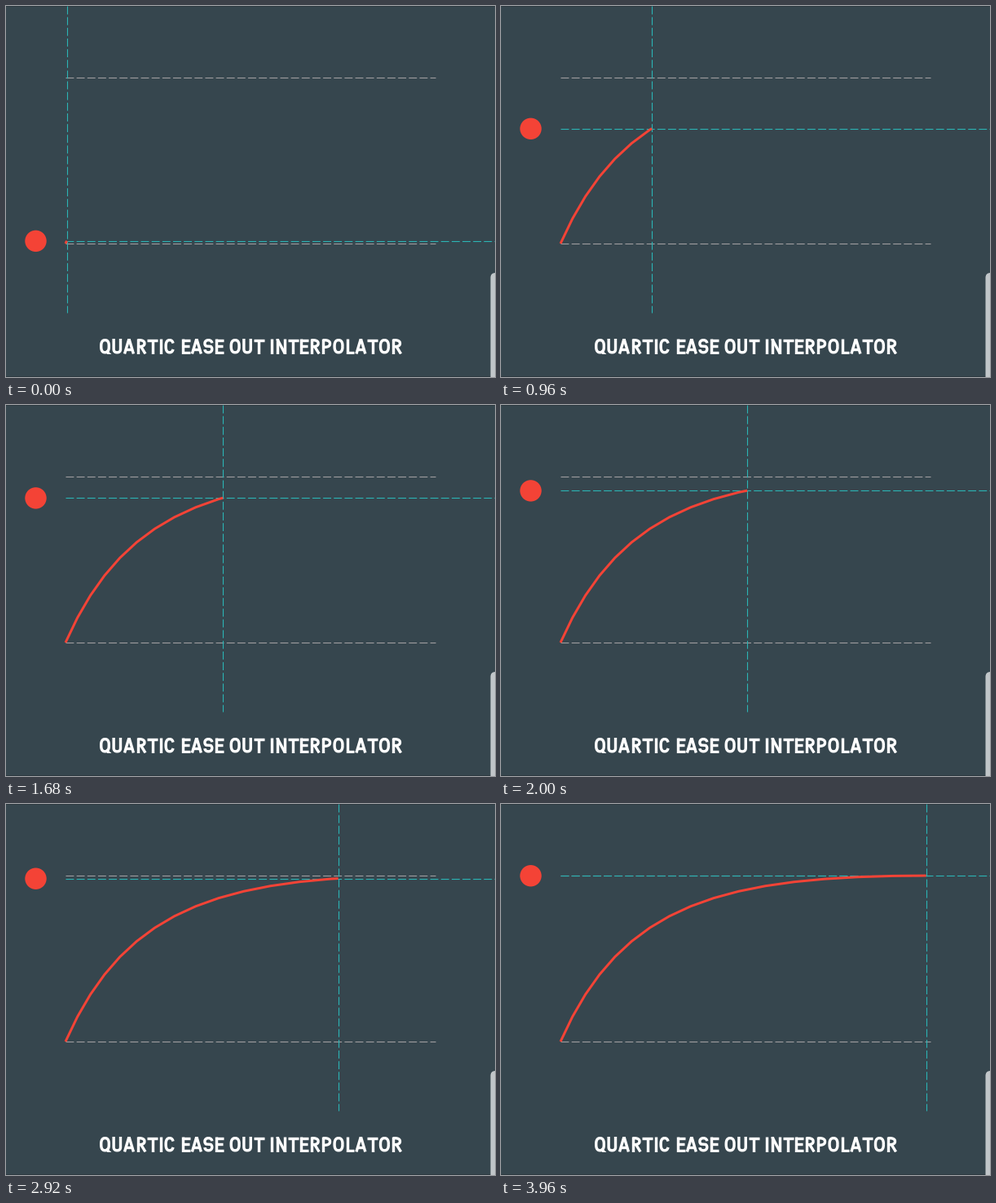
Recreate the animation shown at these times as a matplotlib script. Size 600x456 px, loop 4000 ms.

```python
import numpy as np
import matplotlib.pyplot as plt
from matplotlib.animation import FuncAnimation
from matplotlib.collections import LineCollection
from matplotlib.patches import Circle, FancyBboxPatch, Rectangle

DPI = 64
W, H = 600, 456
PX = 72 / DPI
STEP = 40
FRAMES = 100

BG, RED, CYAN, GRAY = "#36464e", "#f44336", "#2bb5b5", "#a09ea0"
LEFT, RIGHT, TOP, BOTTOM = 73, 527, 88, 292

plt.rcParams["toolbar"] = "None"
fig = plt.figure(figsize=(W / DPI, H / DPI), dpi=DPI, facecolor=BG)
ax = fig.add_axes([0, 0, 1, 1])
ax.set_xlim(0, W)
ax.set_ylim(H, 0)
ax.axis("off")


def dashed(xs, ys, color, z):
    width = 1.1
    dash = (0, (9.9 / width, 3.25 / width))
    line, = ax.plot(xs, ys, color=color, lw=width * PX, ls=dash,
                    dash_capstyle="butt", zorder=z)
    return line


# Condensed capitals built from strokes; y runs up from the baseline.
EM, CAP, PEN = 26, 18.5, 3.4
ADVANCE = dict(Q=.578, U=.553, A=.582, R=.549, T=.532, I=.261, C=.562,
               E=.482, S=.532, O=.587, N=.609, P=.555, L=.468)
SPACE = .22


def arc(x0, x1, y0, y1, start, end, power=2.5):
    a = np.radians(np.linspace(start, end, 40))
    c, s = np.cos(a), np.sin(a)
    x = (x0 + x1) / 2 + (x1 - x0) / 2 * np.sign(c) * abs(c) ** (2 / power)
    y = (y0 + y1) / 2 + (y1 - y0) / 2 * np.sign(s) * abs(s) ** (2 / power)
    return list(zip(x, y))


def strokes(ch, adv):
    h = PEN / 2
    lo, hi, mid = h, CAP - h, CAP / 2
    l, r = 1.4 + h, adv - 1.2 - h
    cx = adv / 2
    stem = [(l, 0), (l, CAP)]
    if ch in "OQC":
        l, r = 1 + h, adv - 1 - h
        if ch == "C":
            return [arc(l, r, lo, hi, 24, 336)]
        ring = [arc(l, r, lo, hi, 0, 360)]
        return ring + ([[(cx + 1, 3.6), (adv - .9, -1.6)]] if ch == "Q" else [])
    if ch == "U":
        return [[(l, CAP)] + arc(l, r, lo, lo + 9, 180, 360) + [(r, CAP)]]
    if ch == "S":
        l, r = .8 + h, adv - .8 - h
        return [arc(l, r, mid - .6, hi, 5, 232, 2.2)
                + arc(l, r, lo, mid + .6, 52, -175, 2.2)]
    if ch == "A":
        foot = h + .4
        return [[(foot, 0), (cx, CAP), (adv - foot, 0)],
                [(cx - 4, 5.4), (cx + 4, 5.4)]]
    if ch == "N":
        return [stem, [(r, 0), (r, CAP)], [(l, CAP), (r, 0)]]
    if ch == "T":
        return [[(.4, hi), (adv - .4, hi)], [(cx, 0), (cx, hi)]]
    if ch == "I":
        return [[(cx, 0), (cx, CAP)]]
    if ch == "L":
        return [stem, [(l, lo), (adv - .4, lo)]]
    if ch == "E":
        return [stem, [(l, lo), (adv - .6, lo)], [(l, hi), (adv - .6, hi)],
                [(l, mid + .2), (adv - 1.5, mid + .2)]]
    waist = 8.2 if ch == "P" else 8.8
    bowl = [(l, hi)] + arc(2 * l - r + 2, r, waist, hi, 90, -90) + [(l, waist)]
    leg = [[(cx, waist), (adv - h - .1, 0)]] if ch == "R" else []
    return [stem, bowl] + leg


def title(text, x, base):
    lines = []
    for ch in text:
        if ch == " ":
            x += SPACE * EM
            continue
        adv = ADVANCE[ch] * EM
        lines += [[(x + px, base - py) for px, py in s] for s in strokes(ch, adv)]
        x += adv
    art = LineCollection(lines, colors="white", linewidths=PEN * PX,
                         capstyle="butt", joinstyle="miter")
    ax.add_collection(art, autolim=False)
    art.set_clip_path(Rectangle((0, base - CAP), W, CAP, transform=ax.transData))


# Ease-out-quart Bezier drawn as sixteen chords.
s = np.linspace(0, 1, 17)


def bezier(p1, p2):
    return 3 * s * (1 - s) ** 2 * p1 + 3 * s ** 2 * (1 - s) * p2 + s ** 3


curve_x = LEFT + (RIGHT - LEFT) * bezier(.165, .44)
curve_y = BOTTOM + (TOP - BOTTOM) * bezier(.84, 1)

# The sweep is nearly linear, with slight changes of pace.
times = [0, 520, 1360, 2000, 2560, 3320, 3960]
sweep = [74.6, 135.5, 230.2, 302.2, 366.4, 453.4, 521.6]

for edge in (0, H - 1):
    ax.add_patch(Rectangle((0, edge), W, 1, fc="#2c3940", lw=0))
ax.add_patch(FancyBboxPatch((601, 334), 30, 160, fc="#c1c6c9", lw=0,
                            boxstyle="round,pad=0,rounding_size=6"))
ax.patches[-1].set_bounds(594.5, 328, 40, 160)
title("QUARTIC EASE OUT INTERPOLATOR", 114, 427.5)

for y in (TOP, BOTTOM):
    dashed([LEFT, RIGHT], [y + .2, y + .2], GRAY, 2)
level = dashed([LEFT, W + 20], [BOTTOM, BOTTOM], CYAN, 3)
cursor = dashed([LEFT, LEFT], [0, 377], CYAN, 3)
trace, = ax.plot([], [], color=RED, lw=3 * PX, solid_capstyle="butt",
                 solid_joinstyle="round", zorder=4)
ball = ax.add_patch(Circle((36.5, BOTTOM), 13.2, fc=RED, lw=0, zorder=4))


def draw(i):
    x = np.interp(i * STEP, times, sweep)
    y = np.interp(x, curve_x, curve_y)
    done = curve_x < x
    trace.set_data(np.append(curve_x[done], x), np.append(curve_y[done], y))
    level.set_ydata([y + .2, y + .2])
    cursor.set_xdata([x, x])
    ball.center = (36.5, y + .2)
    return trace, level, cursor, ball


anim = FuncAnimation(fig, draw, frames=FRAMES, interval=STEP, repeat=True,
                     repeat_delay=0, blit=False)
plt.show()
```
